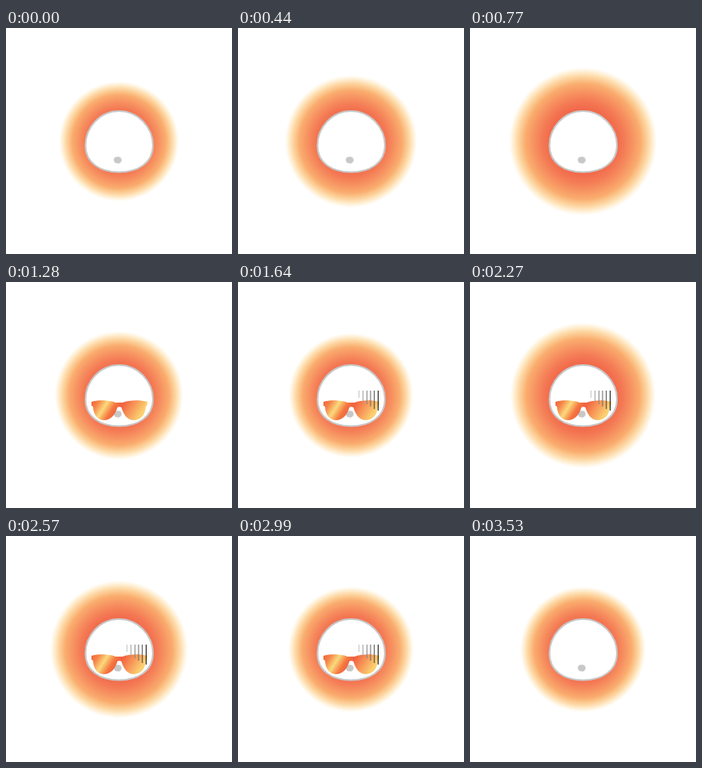
Write an HTML page that moves like this. It is 283 px wide and 283 px high and loops after 3.56 s.

```html
<!DOCTYPE html>
<html lang="en">
<head>
<meta charset="utf-8">
<title>Glowing face</title>
<style>
  html, body { margin: 0; width: 100%; height: 100%; overflow: hidden; background: #fff; }
  svg { display: block; width: 100vw; height: 100vh; }
  .glow, .glasses, .lines { animation: 3560ms linear infinite; }
  .glow {
    transform-origin: 141.5px 142px;
    animation-name: pulse;
    animation-timing-function: cubic-bezier(.37, 0, .63, 1);
  }
  .glasses { animation-name: glasses; }
  .lines { animation-name: lines; }

  @keyframes pulse {
    0%, 4.78% { transform: scale(.75); }
    21.2% { transform: scale(.925); }
    42.7% { transform: scale(.77); }
    63.5% { transform: scale(.91); }
    83.99%, 100% { transform: scale(.785); }
  }
  @keyframes glasses {
    0%, 22.5% { opacity: 0; }
    31%, 92.42% { opacity: 1; }
    99.16%, 100% { opacity: 0; }
  }
  @keyframes lines {
    0%, 37% { opacity: 0; }
    46%, 92.42% { opacity: 1; }
    99.16%, 100% { opacity: 0; }
  }
</style>
</head>
<body>
<svg viewBox="0 0 283 283">
  <defs>
    <radialGradient id="heat">
      <stop offset=".4" stop-color="#f16347"/>
      <stop offset=".55" stop-color="#f47a55"/>
      <stop offset=".7" stop-color="#f89a65"/>
      <stop offset=".78" stop-color="#f9a562" stop-opacity=".92"/>
      <stop offset=".88" stop-color="#fbb356" stop-opacity=".55"/>
      <stop offset="1" stop-color="#ffc850" stop-opacity="0"/>
    </radialGradient>
    <linearGradient id="lens" gradientUnits="userSpaceOnUse" x1="107" y1="148" x2="162" y2="183">
      <stop offset="0" stop-color="#f0603f"/>
      <stop offset=".13" stop-color="#f58447"/>
      <stop offset=".28" stop-color="#fbd97c"/>
      <stop offset=".43" stop-color="#f5763f"/>
      <stop offset=".54" stop-color="#f1603f"/>
      <stop offset=".72" stop-color="#f79157"/>
      <stop offset=".95" stop-color="#fbd070"/>
    </linearGradient>
  </defs>

  <circle class="glow" cx="141.5" cy="142" r="100" fill="url(#heat)"/>

  <path fill="#fff" stroke="#c8c8c8" stroke-width="2"
    d="M141.5 104C166 104 184 125 184 147C184 169 165 180.5 141.5 180.5C118 180.5 99.5 169 99.5 147C99.5 125 117 104 141.5 104Z"/>
  <path fill="#c8c8c8"
    d="M135 165C135 162 137.5 160.8 140 161.2C143 161 145 163 144.8 165.5C144.6 168.5 142 170 139.8 169.6C137 169.6 135 168 135 165Z"/>

  <path class="glasses" fill="url(#lens)"
    d="M107 150C114 147.5 130 147.5 137 151H146C154 147.5 169 147.5 177 150L176.5 155L175 156C174.5 167 168 173 160 173C152 173 147 166 144.5 157Q142 155.5 139.5 157C137 166 131 173 123 173C115 173 109.5 167 109 156L107 155Z"/>

  <g class="lines" fill="none" stroke-width="1">
    <path stroke="#c4c4c4" d="M151.5 136V145"/>
    <path stroke="#a2a2a2" d="M156.5 136V150"/>
    <path stroke="#858585" d="M161.5 136V153"/>
    <path stroke="#666" d="M166 136V156"/>
    <path stroke="#444" d="M170.7 136V159"/>
    <path stroke="#111" d="M175.5 136V161"/>
  </g>
</svg>
</body>
</html>
```
